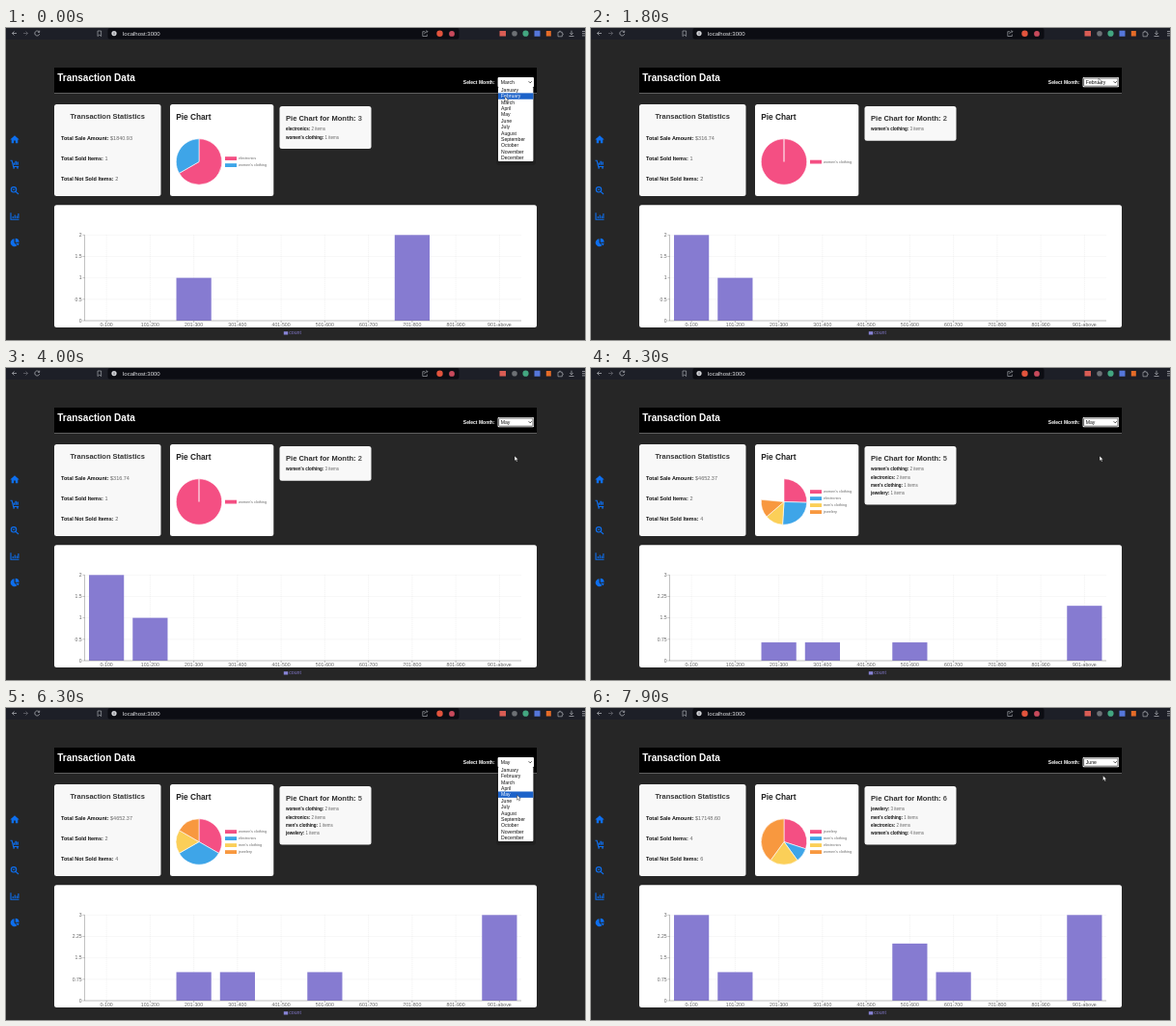
Recreate the animation shown at these times as an HTML page. Size 600x323 px, loop 8000 ms.

```html
<!DOCTYPE html>
<html lang="en">
<head>
<meta charset="utf-8">
<title>Transaction dashboard</title>
<style>
html, body { margin: 0; width: 100%; height: 100%; overflow: hidden; background: #262626; }
svg { display: block; width: 100vw; height: 100vh; font-family: "Liberation Sans", Arial, sans-serif; }
</style>
</head>
<body>
<svg id="stage" viewBox="0 0 600 323">
  <rect width="600" height="323" fill="#262626"/>
  <g id="browser"></g>
  <g id="sidebar" fill="#0d6ff0" stroke="#0d6ff0" stroke-width="0">
    <path d="M4.3 115.4L9 111.2l4.7 4.2h-1.4v3.8h-2.4v-2.8H8.100v2.800H5.700v-3.800z"/>
    <g fill="none" stroke-width="1.100">
      <path d="M4.500 137.300h1.600l1.500 6.200h5.600"/>
      <path d="M8.300 141.800v-2.300M10.200 141.800v-4M12.100 141.800v-3.200" stroke-width="1.400"/>
      <circle cx="8" cy="167.300" r="2.700"/><path d="M10 169.300l3 2.700M6.700 167.300h2.600"/>
      <path d="M5 191.300v7h8.500"/><path d="M7.200 197v-2M9.200 197v-3.500M11.200 197v-2.500M12.900 197v-5"/>
    </g>
    <circle cx="8.100" cy="144.800" r=".9"/><circle cx="12" cy="144.800" r=".9"/>
    <path d="M8.500 218.300v4l2.900 2.900A4 4 0 1 1 8.500 218.300zM9.700 217.800a4 4 0 0 1 3.900 3.900h-3.900zM9.800 222.700h3.800a4 4 0 0 1-1.200 2.500z"/>
  </g>
  <g id="page"></g>
  <g id="menu"></g>
  <path id="cursor" d="M0 0v5.200l1.200-1.100 .9 2 1-.5-.9-1.900h1.600z" fill="#fff" stroke="#111" stroke-width=".4"/>
</svg>
<script>
const LOOP = 8000;
const PIE_MS = 333, BAR_MS = 500;
const COLORS = ['#f44f83', '#3ea5e8', '#fbcf58', '#f8983f'];
const MONTHS = ['January', 'February', 'March', 'April', 'May', 'June', 'July',
  'August', 'September', 'October', 'November', 'December'];
const RANGES = ['0-100', '101-200', '201-300', '301-400', '401-500', '501-600',
  '601-700', '701-800', '801-900', '901-above'];
const ROW = 6.37, LIST_TOP = 61;

// bars: range index -> count
const reports = [
  { month: 3, click: -2000, load: -2000, barStart: -2000, amount: '$1840.93', sold: 1, unsold: 2, max: 2,
    items: [['electronics', 2], ["women's clothing", 1]], bars: { 2: 1, 7: 2 } },
  { month: 2, click: 300, load: 620, barStart: 650, amount: '$316.74', sold: 1, unsold: 2, max: 2,
    items: [["women's clothing", 3]], bars: { 0: 2, 1: 1 } },
  { month: 5, click: 3900, load: 4200, barStart: 4115, amount: '$4652.37', sold: 2, unsold: 4, max: 3,
    items: [["women's clothing", 2], ['electronics', 2], ["men's clothing", 1], ['jewelery', 1]],
    bars: { 2: 1, 3: 1, 5: 1, 9: 3 } },
  { month: 6, click: 7000, load: 7260, barStart: 7310, amount: '$17148.60', sold: 4, unsold: 6, max: 3,
    items: [['jewelery', 3], ["men's clothing", 1], ['electronics', 2], ["women's clothing", 4]],
    bars: { 0: 3, 1: 1, 5: 2, 6: 1, 9: 3 } }
];
const openTimes = [[0, 300], [2100, 3900], [5600, 7000]];
const cursorPath = [[0, 517, 71], [300, 517, 71], [1000, 526, 55], [1800, 526, 52], [2100, 526, 55],
  [2800, 527, 77], [3400, 527, 91], [4500, 527, 91], [5300, 529, 56], [5650, 529, 56],
  [6200, 529.5, 90], [6500, 529.5, 90], [6800, 528.5, 97], [7300, 528.5, 97.5], [7900, 530.5, 70], [8000, 530.5, 70]];

const $ = id => document.getElementById(id);
const clamp = v => Math.max(0, Math.min(1, v));
const easeOutQuart = p => 1 - (1 - p) ** 4;
const smooth = p => p * p * (3 - 2 * p);

// cubic-bezier(.25, .1, .25, 1)
function ease(p) {
  let lo = 0, hi = 1;
  const curve = (a, b, s) => 3 * a * s * (1 - s) ** 2 + 3 * b * s * s * (1 - s) + s ** 3;
  for (let i = 0; i < 20; i++) {
    const mid = (lo + hi) / 2;
    if (curve(.25, .25, mid) < p) lo = mid; else hi = mid;
  }
  return p >= 1 ? 1 : curve(.1, 1, lo);
}

const rect = (x, y, w, h, fill, extra = '') =>
  `<rect x="${x}" y="${y}" width="${w}" height="${h}" fill="${fill}" ${extra}/>`;
const line = (d, stroke, width = .4, extra = '') =>
  `<path d="${d}" fill="none" stroke="${stroke}" stroke-width="${width}" ${extra}/>`;
const text = (x, y, size, fill, content, extra = '') =>
  `<text x="${x}" y="${y}" font-size="${size}" fill="${fill}" ${extra}>${content}</text>`;
const dot = (x, y, r, fill) => `<circle cx="${x}" cy="${y}" r="${r}" fill="${fill}"/>`;
const bold = 'font-weight="700"';
const labelled = (x, y, size, label, value, color = '#666') =>
  text(x, y, size, '#111', `${label}: <tspan font-weight="400" fill="${color}">${value}</tspan>`, bold);

function browserBar() {
  const ink = '#b8bac0';
  return rect(0, 0, 600, 12, '#1d1f27') + rect(105.5, 0, 364, 11.5, '#0c0d13', 'rx="2"') +
    line('M11 5.500H6.500M8.500 3.500l-2 2 2 2', ink, .7) +
    line('M18 5.500h4.500M20.500 3.500l2 2-2 2', '#6c6e75', .7) +
    line('M34.300 4a2.500 2.500 0 1 0 .4 2.200M34.700 2.700v1.700h-1.700', ink, .7) +
    line('M95 3h3.600v5.500l-1.800-1.500-1.800 1.500z', ink, .6) +
    dot(112, 5.600, 2.600, '#d5d6da') + line('M112 5.200v1.900M112 3.800v.7', '#0c0d13', .6) +
    text(121, 7.800, 6, '#e4e5e8', 'localhost:3000') +
    line('M434 3.700h-2.200v4.800h4.500V6.500M433.700 6.300c.2-2 1.300-2.600 3-2.600M435.500 2.300l1.400 1.400-1.400 1.400', ink, .6) +
    dot(449.500, 5.700, 3.200, '#e2543d') + dot(462, 5.900, 2.900, '#c84a5c') +
    rect(511.500, 3, 6.500, 5.500, '#d95c55') + dot(527, 5.700, 2.800, '#6d7075') +
    dot(538.500, 5.700, 3.100, '#43a681') + rect(547.500, 2.700, 6, 6, '#5577dc') +
    rect(559.800, 3, 5, 5.500, '#e46b28') +
    line('M572 4.300h1.500v-1h1.300v1h1.500v1.500h.9v1.300h-.9v1.700H572z', ink, .6) +
    line('M586 2.700v4M584.300 5.200l1.700 1.700 1.700-1.700M583.500 8.500h5', ink, .7) +
    line('M597 3.500h3M597 5.700h3M597 7.900h3', ink, .7);
}

function sector(from, to, color) {
  const cx = 200, cy = 138.5, r = 23.7;
  const point = a => `${cx + r * Math.sin(a)} ${cy - r * Math.cos(a)}`;
  const end = Math.min(to, from + 2 * Math.PI - .0005);
  return `<path d="M${cx} ${cy}L${point(from)}A${r} ${r} 0 ${+(end - from > Math.PI)} 1 ${point(end)}Z"
    fill="${color}" stroke="#fff" stroke-width=".6"/>`;
}

function pieCard(report, t) {
  const total = report.items.reduce((sum, item) => sum + item[1], 0);
  const turn = 2 * Math.PI * easeOutQuart(clamp((t - report.load) / PIE_MS)) / total;
  let out = rect(170, 79, 107.3, 95, '#fff', 'rx="2.5"') + text(176.2, 94.5, 8.3, '#222', 'Pie Chart', bold);
  let angle = 0;
  report.items.forEach(([name, count], i) => {
    const y = 138.6 + (i - (report.items.length - 1) / 2) * 7;
    if (turn > 0) out += sector(angle, angle + count * turn, COLORS[i]);
    angle += count * turn;
    out += rect(227, y - 1.9, 12, 3.8, COLORS[i]) + text(241, y + 1.3, 3.8, '#666', name);
  });
  return out;
}

function statsCard(report) {
  return rect(50, 79, 110.5, 95, '#f8f8f8', 'rx="2.5"') +
    text(105.2, 94.4, 7.5, '#333', 'Transaction Statistics', bold + ' text-anchor="middle"') +
    labelled(57, 116.2, 5.5, 'Total Sale Amount', report.amount) +
    labelled(57, 137.2, 5.5, 'Total Sold Items', report.sold) +
    labelled(57, 158.2, 5.5, 'Total Not Sold Items', report.unsold);
}

function monthCard(report) {
  const height = 35.7 + 8.3 * (report.items.length - 1);
  return rect(283.5, 81, 95, height, '#f8f8f8', 'rx="2.5"') +
    text(290, 95.6, 7.55, '#2b2b2b', `Pie Chart for Month: <tspan fill="#555">${report.month}</tspan>`, bold) +
    report.items.map(([name, count], i) =>
      labelled(290, 106.2 + 8.3 * i, 4.5, name, `${count} items`)).join('');
}

function barChart(report, t) {
  const left = 81.5, top = 214.3, bottom = 303, band = 45.25, height = bottom - top;
  const grow = ease(clamp((t - report.barStart) / BAR_MS));
  let grid = '', axes = '', bars = '';
  for (let i = 0; i <= 4; i++) {
    const y = bottom - height * i / 4;
    grid += `M${left} ${y}h${band * 10}`;
    axes += line(`M${left - 2} ${y}h2`, '#666') +
      text(left - 2.8, y + 1.8, 5.1, '#666', report.max * i / 4, 'text-anchor="end"');
  }
  RANGES.forEach((range, i) => {
    const x = left + band * (i + .5);
    grid += `M${x} ${top}V${bottom}`;
    axes += line(`M${x} ${bottom}v2`, '#666') + text(x, 309, 5.2, '#666', range, 'text-anchor="middle"');
    const barHeight = height * (report.bars[i] || 0) / report.max * grow;
    if (barHeight) bars += rect(x - 18.1, bottom - barHeight, 36.2, barHeight, '#867bd1');
  });
  return rect(50, 183.3, 500, 126.7, '#fff', 'rx="2.5"') +
    line(grid, '#d4d4d4', .35, 'stroke-dasharray="1 1"') + bars + axes +
    line(`M${left} ${top}V${bottom}h${band * 10}`, '#666') +
    rect(287.8, 314.2, 4.4, 3.3, '#8884d8') + text(293.2, 317.3, 5.2, '#8076c8', 'count');
}

function header() {
  return rect(50, 41, 500, 27, '#000') + rect(50, 67.2, 500, .8, '#777') +
    text(53.2, 55.2, 10, '#fff', 'Transaction Data', bold) +
    text(473.8, 57.6, 5, '#fff', 'Select Month:', bold);
}

function monthSelect(selected, isOpen, pointerY) {
  let out = rect(509.6, 51, 37.4, 10.2, '#fff', 'rx="1"');
  if (!isOpen) out += rect(510.6, 52, 35.4, 8.2, '#fff', 'rx=".6" stroke="#222" stroke-width=".7"');
  out += text(512.8, 58, 5.1, '#111', MONTHS[selected - 1]) + line('M541.7 55.300l1.500 1.500 1.500-1.500', '#111', .8);
  if (!isOpen) return out;
  const hovered = pointerY < LIST_TOP ? selected - 1 : Math.floor((pointerY - LIST_TOP) / ROW);
  out += rect(508, 62, 41, 80, '#000', 'rx="3" opacity=".15"') + rect(510, LIST_TOP, 36.4, 77, '#fff', 'rx="1"');
  MONTHS.forEach((name, i) => {
    const y = LIST_TOP + ROW * i;
    if (i === hovered) out += rect(510, y, 36.4, ROW, '#1c62c9');
    out += text(513, y + 5, 5.1, i === hovered ? '#fff' : '#111', name);
  });
  return out;
}

function cursorAt(t) {
  const next = cursorPath.findIndex(key => key[0] > t);
  const [t0, x0, y0] = cursorPath[next - 1], [t1, x1, y1] = cursorPath[next];
  const p = smooth((t - t0) / (t1 - t0));
  return [x0 + (x1 - x0) * p, y0 + (y1 - y0) * p];
}

function render(t) {
  const latest = test => reports.filter(test).pop();
  const report = latest(r => t >= Math.min(r.load, r.barStart));
  const selected = latest(r => t >= r.click).month;
  const isOpen = openTimes.some(([from, to]) => t >= from && t < to);
  const [x, y] = cursorAt(t);
  $('page').innerHTML = header() + statsCard(report) + pieCard(report, t) + monthCard(report) + barChart(report, t);
  $('menu').innerHTML = monthSelect(selected, isOpen, y);
  $('cursor').setAttribute('transform', `translate(${x} ${y})`);
}

$('browser').innerHTML = browserBar();
const start = performance.now();
function tick() {
  render((performance.now() - start) % LOOP);
  requestAnimationFrame(tick);
}
tick();
</script>
</body>
</html>
```
